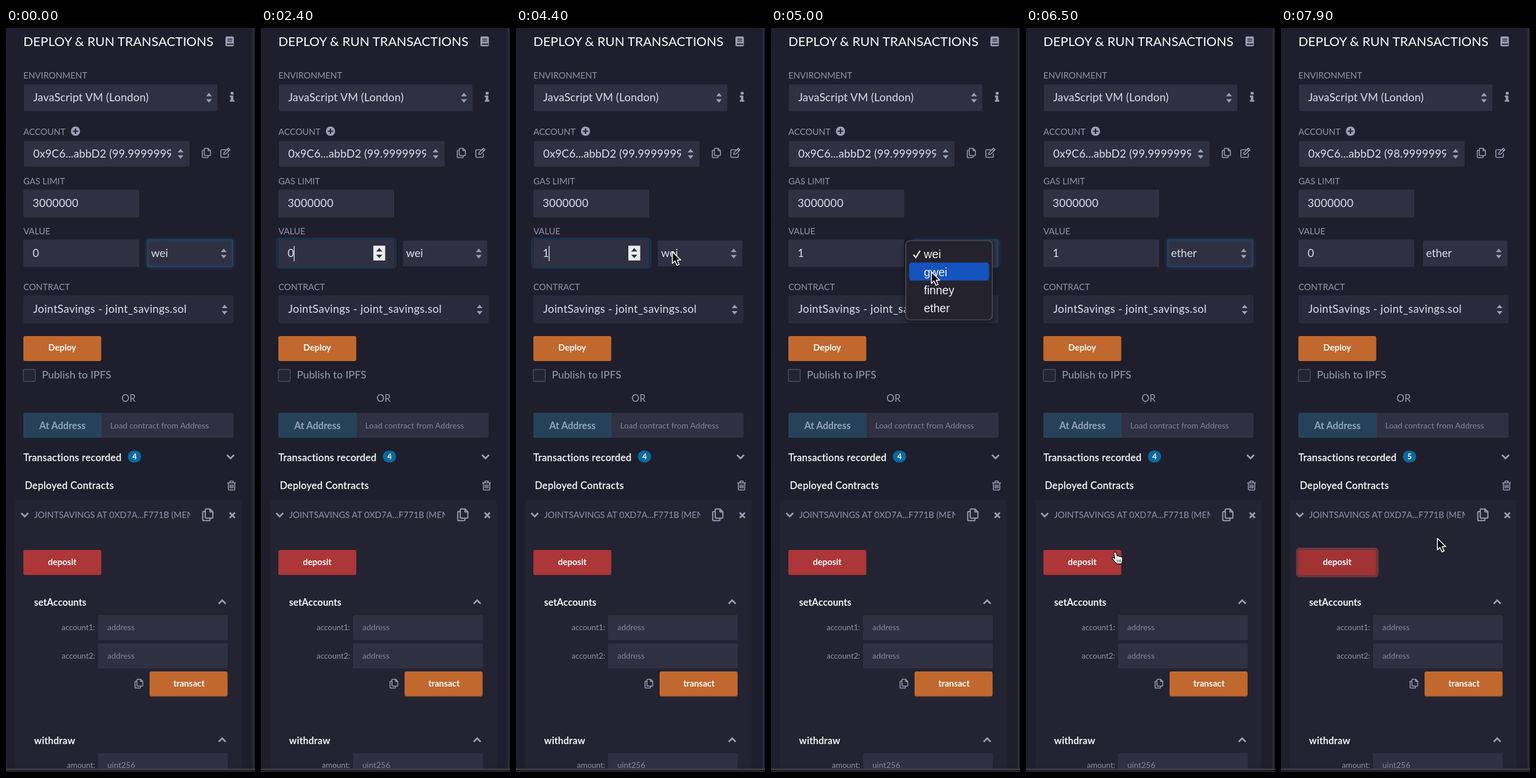
Write an HTML page that moves like this. It is 430x1280 px and loops after 8000 ms.

```html
<!DOCTYPE html>
<html lang="en">
<head>
<meta charset="utf-8">
<title>Deploy panel</title>
<style>
  html, body { margin: 0; width: 100%; height: 100%; overflow: hidden; background: #1f1e2c; }
  svg { display: block; width: 430px; height: 1280px; }
  text { font-family: Lato, "Open Sans", sans-serif; white-space: pre; }
  .menu text { font: 19.7px "Liberation Sans", Arial, sans-serif; fill: #f2f2f5; }
  .label { font-size: 15px; fill: #9093aa; }
  .field { font-size: 19px; fill: #dcdee8; }
  .head { font-size: 17px; fill: #fff; stroke: #fff; stroke-width: .3px; letter-spacing: .3px; }
  .sub { font-size: 16.5px; font-weight: 700; fill: #f4f4f8; }
  .btn { font-size: 15px; font-weight: 700; fill: #fff; text-anchor: middle; }
  .hint { font-size: 14px; fill: #84879a; }
  .arg { font-size: 13.5px; fill: #9093aa; text-anchor: end; }
  .line { fill: none; stroke: #9a9db5; stroke-width: 1.6; stroke-linejoin: round; stroke-linecap: round; }
  .chev { fill: none; stroke: #9a9db5; stroke-width: 3; }
  .solid { fill: #9a9db5; }
  .cut { fill: #1f1e2c; }
  .blue { fill: #26425a; }
</style>
</head>
<body>
<svg id="stage" viewBox="0 0 430 1280">
  <defs>
    <filter id="glow" x="-20%" y="-40%" width="140%" height="180%"><feGaussianBlur stdDeviation="2"/></filter>
    <filter id="shade" x="-20%" y="-20%" width="140%" height="150%"><feGaussianBlur stdDeviation="5"/></filter>
    <clipPath id="accountClip"><rect x="31" y="195" width="254" height="44"/></clipPath>
    <clipPath id="nameClip"><rect x="40" y="820" width="278" height="36"/></clipPath>
  </defs>
  <rect width="430" height="1280" fill="#1f1e2c"/>
  <g id="panel"></g>
  <g id="unitGlow">
    <rect x="244" y="364" width="148" height="47" rx="3" fill="none" stroke="#1b5f91" stroke-width="3.4" opacity=".5" filter="url(#glow)"/>
    <rect x="244.5" y="364.5" width="147" height="46" rx="2" fill="none" stroke="#24496a" stroke-width="1.2"/>
  </g>
  <rect id="valueGlow" x="27.8" y="362.3" width="204.5" height="50.5" rx="4" fill="none" stroke="#17324a" stroke-width="3.4"/>
  <text id="value" class="field" x="46" y="394"></text>
  <rect id="caret" y="375" width="1.3" height="26" fill="#f0f0f5"/>
  <g id="spinner">
    <rect x="194" y="374.5" width="20.5" height="25.5" fill="#ececee"/>
    <path d="M199 384.5l5.2-6 5.2 6zM199 390l5.2 6 5.2-6z" fill="#33333a"/>
  </g>
  <g id="menu" class="menu">
    <rect x="232" y="368" width="151" height="137" rx="7" fill="#000" opacity=".5" filter="url(#shade)"/>
    <rect x="232.7" y="366" width="149.5" height="136" rx="7" fill="#24222d" stroke="#5c5b67" stroke-width="1.2"/>
    <rect id="pick" x="238.5" width="138" height="31" rx="4.5" fill="#1553bd"/>
    <path d="M246 390l4 5 7.5-12" fill="none" stroke="#f2f2f5" stroke-width="2.3"/>
  </g>
  <g id="cursor" stroke-linejoin="round" stroke-linecap="round">
    <path id="arrow" d="M0 0V20l4.6-4.3 3.4 7.7 3.7-1.6-3.3-7.5h6.2Z" fill="#0b0b0d" stroke="#fff" stroke-width="1.5"/>
    <g id="beam" fill="none">
      <path d="M-4-10q4 0 4 3V8q0 3-4 3M4-10q-4 0-4 3M0 8q0 3 4 3M-2.5 1h5" stroke="#f4f4f6" stroke-width="4.2"/>
      <path d="M-4-10q4 0 4 3V8q0 3-4 3M4-10q-4 0-4 3M0 8q0 3 4 3M-2.5 1h5" stroke="#1a1a20" stroke-width="1.5"/>
    </g>
    <g id="hand">
      <path d="M-2.4 1.8C-2.4-.8 1.3-1 2 1.2L3.4 6.5C5 5.6 6.5 6.2 6.8 7.2 8.5 6.4 10 7.2 10.3 8.2 12 7.7 13 8.8 13 10.2L12.5 15.5 11 20H2.5L-1 15.7-5 11.2C-5.7 9-3.4 8.5-2 9.8L-.5 11Z" fill="#fff" stroke="#111" stroke-width="1.3"/>
      <path d="M3.6 13v4M6.3 13v4M9 13v4" fill="none" stroke="#222" stroke-width="1"/>
    </g>
  </g>
</svg>
<script>
const $ = id => document.getElementById(id);
const LOOP = 8000, STEP = 100;

const text = (cls, x, y, s, extra = '') => `<text class="${cls}" x="${x}" y="${y}" ${extra}>${s}</text>`;
const rect = (x, y, w, h, fill = '#2f3042', rx = 2, extra = '') =>
  `<rect x="${x}" y="${y}" width="${w}" height="${h}" rx="${rx}" fill="${fill}" ${extra}/>`;
const path = (cls, d) => `<path class="${cls}" d="${d}"/>`;
const space = n => `letter-spacing="${n}"`;
const sorter = (x, y) => path('solid', `M${x - 5} ${y - 2.5}l5-6 5 6zM${x - 5} ${y + 2.5}l5 6 5-6z`);
const chevron = (x, y, dir) => path('chev', `M${x - 6} ${y - 3 * dir}l6 ${6 * dir} 6 ${-6 * dir}`);
const copy = (x, y, k) => `<g transform="translate(${x} ${y}) scale(${k})">` +
  path('line', 'M-2.5-8H3L7-4V3.5Q7 4.5 6 4.5H-2.5Q-3.5 4.5-3.5 3.5V-7Q-3.5-8-2.5-8ZM3-8v4h4M-3.5-4.5H-6Q-7-4.5-7-3.5V7Q-7 8-6 8H2Q3 8 3 7V4.5') + '</g>';

$('panel').innerHTML = [
  rect(426.3, 0, 1.5, 1275, '#373742', 0),
  text('', 30, 31, 'DEPLOY &amp; RUN TRANSACTIONS', `font-size="22" fill="#fff" ${space(.08)}`),
  rect(379, 14.5, 14.5, 17, '#9a9db5', 2.5),
  path('cut', 'M382.5 18.5h8v1.5h-8zM382.5 21.8h8v1.5h-8zM381.5 26.8h11v2h-11z'),

  text('label', 30, 86.5, 'ENVIRONMENT'),
  rect(31, 97, 334, 46),
  text('field', 47, 125.5, 'JavaScript VM (London)', space(.17)),
  sorter(350.5, 120),
  path('solid', 'M388 110h5v4.6h-5zM386.5 116.3h6v7.7h1.7v2.8h-7.7V124h1.7v-4.9h-1.7z'),

  text('label', 30, 183.5, 'ACCOUNT'),
  '<circle class="solid" cx="120" cy="177.5" r="8"/><path d="M115.5 177.5h9M120 173v9" stroke="#1f1e2c" stroke-width="2.2"/>',
  rect(31, 194.5, 286, 44),
  text('field', 47, 222.5, '', `id="account" clip-path="url(#accountClip)" ${space(.12)}`),
  sorter(301.5, 216.5),
  copy(346, 215, 1),
  path('line', 'M379.5 209.5H372.5Q371 209.5 371 211V221Q371 222.5 372.5 222.5H382.5Q384 222.5 384 221V216.5'),
  path('line', 'M376 217.5l.6-3.3 7.3-7.3 2.8 2.8-7.4 7.3zM382 208.8l2.8 2.8'),

  text('label', 30, 269, 'GAS LIMIT'),
  rect(30, 278, 200, 48),
  text('field', 46, 307.5, '3000000', space(.3)),

  text('label', 30, 355, 'VALUE'),
  rect(30, 364, 200, 47),
  rect(245, 365.5, 146, 44.5),
  text('field', 250.5, 394, '', 'id="unit"'),
  sorter(376, 388),

  text('label', 30, 451, 'CONTRACT'),
  rect(30, 460, 363, 48, '#292a3b'),
  text('field', 47, 490, 'JointSavings - joint_savings.sol', space(.35)),
  sorter(377.5, 484.5),

  rect(30, 530, 134.5, 43, '#c1682f', 3),
  text('btn', 97, 554.5, 'Deploy'),
  rect(30, 587.5, 20.5, 20.5, '#242534', 1.5, 'stroke="#4d4f64" stroke-width="1.3"'),
  text('', 62, 603, 'Publish to IPFS', `font-size="18" fill="#9a9db5" ${space(.08)}`),
  text('', 211.7, 643, 'OR', 'font-size="17" fill="#9a9db5" text-anchor="middle"'),
  rect(30, 662, 363, 43, '#2f3042', 3),
  path('blue', 'M165 662V705H33Q30 705 30 702V665Q30 662 33 662Z'),
  text('', 97.5, 690, 'At Address', 'font-size="16.5" font-weight="700" fill="#93a4b6" text-anchor="middle"'),
  text('hint', 180, 688.5, 'Load contract from Address', space(.05)),

  text('head', 30, 745, 'Transactions recorded'),
  rect(210.3, 727, 23.2, 20.5, '#07699c', 10.2),
  text('', 222, 742, '', 'id="count" font-size="13" font-weight="700" fill="#fff" text-anchor="middle"'),
  chevron(387.7, 737.5, 1),
  text('head', 32.5, 793, 'Deployed Contracts'),
  path('line', 'M382.5 782.5h14M387 782v-2.5h5V782M384 783v10.5q0 1.3 1.3 1.3h8.4q1.3 0 1.3-1.3V783M387 786v5.5M389.5 786v5.5M392 786v5.5'),

  rect(16, 812, 391, 463, '#232332', 2),
  chevron(32.3, 837.5, 1),
  text('label', 48.5, 843.3, 'JOINTSAVINGS AT 0XD7A...F771B (MEMORY)', 'clip-path="url(#nameClip)"'),
  copy(348.5, 837.5, 1.25),
  path('chev', 'M386.3 833.8l9 9M395.3 833.8l-9 9'),

  rect(30, 898, 134.5, 43, '#ad3638', 3, 'id="deposit"'),
  rect(28, 896, 138.5, 47, 'none', 4, 'id="ring" stroke="#6d383c" stroke-width="4"'),
  text('btn', 97, 924, 'deposit'),

  text('sub', 48.5, 994, 'setAccounts'),
  chevron(373.3, 987.5, -1),
  ...[1, 2].map(n => {
    const y = 961.3 + 48.7 * n;
    return text('arg', 154, y + 26, `account${n}:`) + rect(159, y, 224, 43) + text('hint', 175, y + 26, 'address');
  }),
  copy(229.5, 1128, .95),
  rect(248, 1108.5, 134.5, 42, '#7d4a2a', 3),
  rect(248, 1107, 134.5, 42.3, '#c1682f', 3),
  text('btn', 316, 1133, 'transact'),

  text('sub', 48.5, 1231.5, 'withdraw', space(.15)),
  chevron(373.3, 1225, -1),
  text('arg', 154, 1273, 'amount:'),
  rect(159, 1247.5, 224, 27),
  text('hint', 175, 1273, 'uint256'),
  rect(0, 1275, 430, 5, '#20202a', 0),
  rect(0, 1274.5, 430, 1.6, '#4a4a50', 0)
].join('');

const units = ['wei', 'gwei', 'finney', 'ether'];
$('menu').insertAdjacentHTML('beforeend', units.map((u, i) => text('', 264, 395.5 + 31 * i, u)).join(''));

// time, x, y of the pointer
const track = [
  [100, 392, 470], [300, 300, 430], [600, 120, 405], [900, 52, 394],
  [3600, 52, 394], [4400, 270, 385], [4700, 271, 386], [5400, 286, 471],
  [5600, 286, 471], [6500, 154, 902], [6800, 130, 912], [7100, 124, 914],
  [7400, 124, 914], [7800, 270, 878]
];

function pointer(t) {
  const i = track.findIndex(k => k[0] > t);
  if (i < 0) return track[track.length - 1].slice(1);
  if (i === 0) return track[0].slice(1);
  const a = track[i - 1], b = track[i];
  let p = (t - a[0]) / (b[0] - a[0]);
  p = p * p * (3 - 2 * p);
  return [a[1] + (b[1] - a[1]) * p, a[2] + (b[2] - a[2]) * p];
}

const during = (t, ...spans) => spans.some(([a, b]) => t >= a && t < b);
const inside = (x, y, l, top, w, h) => x >= l && x <= l + w && y >= top && y <= top + h;
const show = (id, on) => $(id).setAttribute('opacity', Number(on));
const write = (id, s) => { if ($(id).textContent !== s) $(id).textContent = s; };

function draw(t) {
  const [x, y] = pointer(t);
  const shown = during(t, [100, 2400], [3700, LOOP]);
  const inValue = shown && inside(x, y, 30, 364, 200, 47);
  const overButton = inside(x, y, 30, 898, 134.5, 43) || inside(x, y, 30, 530, 134.5, 43);
  const focused = during(t, [1300, 4700]);
  const done = t >= 7600;
  const digit = t < 2500 || done ? '0' : t < 3400 ? '' : '1';

  show('cursor', shown);
  $('cursor').setAttribute('transform', `translate(${x} ${y})`);
  show('beam', inValue);
  show('hand', overButton);
  show('arrow', !inValue && !overButton);

  show('unitGlow', t === 1300 ? .5 : during(t, [0, 1300], [4700, 7400]));
  show('valueGlow', t === 1300 ? .5 : focused);
  show('spinner', focused || inValue);
  show('caret', during(t, [1400, 1700], [2100, 2700], [3000, 3900], [4300, 4700]));
  $('caret').setAttribute('x', digit ? 56.6 : 46);

  write('value', digit);
  write('unit', t < 5600 ? 'wei' : 'ether');
  write('account', `0x9C6...abbD2 (${done ? 98 : 99}.999999999`);
  write('count', done ? '5' : '4');

  const row = Math.max(0, Math.min(3, Math.floor((y - 373) / 31)));
  show('menu', t === 5600 ? .5 : during(t, [4700, 5600]));
  show('pick', t !== 5500);
  $('pick').setAttribute('y', 372.5 + 31 * row);

  show('ring', t === 7400 ? .5 : t > 7400);
  $('deposit').setAttribute('fill', t >= 7400 ? '#a13335' : '#ad3638');
}

function tick(now) {
  draw(Math.floor((now % LOOP) / STEP) * STEP);
  requestAnimationFrame(tick);
}
draw(0);
requestAnimationFrame(tick);
</script>
</body>
</html>
```
